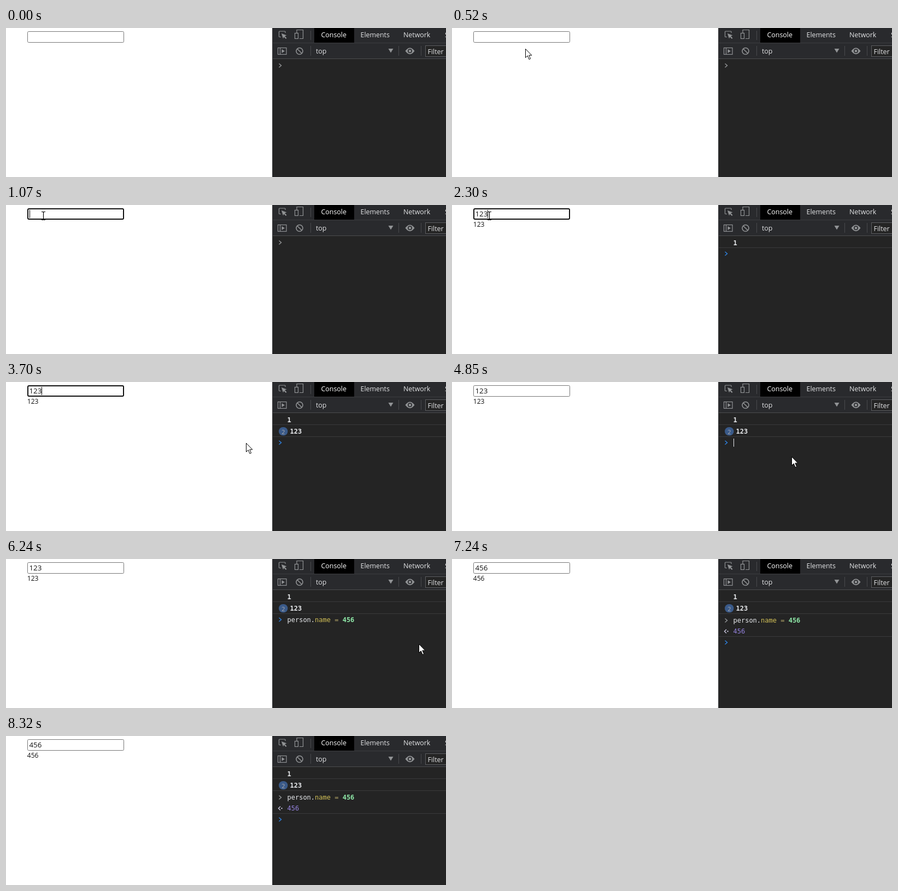
Recreate the animation shown at these times as an HTML page. Size 805 by 274 pixels, loop 8620 ms.

```html
<!DOCTYPE html>
<html lang="en">
<head>
<meta charset="utf-8">
<title>Input bound to an object</title>
<style>
html, body { margin: 0; width: 100%; height: 100%; overflow: hidden; background: #fff; }
svg { display: block; width: 805px; height: 274px; }
text { white-space: pre; }
.ui { font: 12.4px "Open Sans", "Noto Sans", sans-serif; fill: #e3e4e6; }
.page { font: 12px "Open Sans", "Noto Sans", sans-serif; fill: #111; }
.mono { font: 12px "DejaVu Sans Mono", monospace; fill: #e8eaed; }
.bold { font-weight: bold; }
.icon { fill: none; stroke: #919395; stroke-width: 1.2; }
.solid { fill: #919395; }
.chev { fill: none; stroke-width: 1.5; }
</style>
</head>
<body>
<svg viewBox="0 0 805 274">
  <rect width="805" height="274" fill="#fff"/>

  <rect id="field" fill="#fff"/>
  <text id="value" class="page" x="42.5" y="21" style="font-size:13.333px"></text>
  <text id="label" class="page" x="38.8" y="40"></text>

  <g id="panel">
    <rect x="487" width="318" height="274" fill="#242424"/>
    <rect x="487" width="318" height="56" fill="#292a2d"/>
    <rect x="564" width="73" height="27" fill="#000"/>
    <path d="M487 27.5H805" stroke="#3c3d40"/>
    <path d="M487 56.5H805" stroke="#4b4c4f"/>
    <path d="M487.5 0V274" stroke="#3f4042"/>
    <path d="M557.5 5V22M557.5 33V51M718.5 33V51M759.5 33V51" stroke="#48494c"/>
    <rect x="767.5" y="32.5" width="60" height="20" fill="#242424" stroke="#5c5d60"/>

    <text class="ui" x="576.5" y="17" style="fill:#fff">Console</text>
    <text class="ui" x="648.5" y="17">Elements</text>
    <text class="ui" x="727" y="17">Network</text>
    <text class="ui" x="803" y="17">Sources</text>
    <text class="ui" x="567" y="47">top</text>
    <text class="ui" x="771.5" y="48">Filter</text>

    <g class="icon">
      <path d="M503 16.5H500.5Q499.500 16.500 499.500 15.500V7Q499.500 6 500.500 6H510Q511 6 511 7V9"/>
      <path d="M532 9V3.500H543.500V19.500H537"/>
      <rect x="528.500" y="9.500" width="6" height="10"/>
      <rect x="497.500" y="36.500" width="15.500" height="12"/>
      <path d="M501.500 36.500V48.500"/>
      <circle cx="537" cy="42.500" r="6" stroke-width="1.600"/>
      <path d="M533 38.500L541 46.500" stroke-width="1.600"/>
    </g>
    <g class="solid">
      <path d="M504 10L513.500 13.500L510 15L513.500 18.500L512 20L508.500 16.500L507 19.500Z"/>
      <path d="M504.500 39V46L510 42.500Z"/>
      <path d="M699.500 38H708.500L704 45.500Z"/>
      <path d="M730.500 42.300Q739 30.500 747.500 42.300Q739 54 730.500 42.300Z"/>
    </g>
    <circle cx="739" cy="42.300" r="3.200" fill="#919395" stroke="#292a2d" stroke-width="1.600"/>
  </g>

  <g id="logOne">
    <text class="mono bold" x="514.500" y="74">1</text>
    <path d="M488 78.500H805" stroke="#3a3a3b"/>
  </g>
  <g id="logTwo">
    <text id="logText" class="mono bold" y="95">123</text>
    <path d="M488 100.500H805" stroke="#3a3a3b"/>
  </g>
  <g id="badge">
    <rect x="499" y="83" width="16.500" height="15.500" rx="7.700" fill="#3a5a89"/>
    <text class="mono" x="507.200" y="95.500" text-anchor="middle" style="font-size:11px;fill:#a0a3a8">2</text>
  </g>
  <text id="command" class="mono" x="514.500"><tspan>person.</tspan><tspan fill="#d2c057">name</tspan><tspan fill="#a89c62"> = </tspan><tspan class="bold" fill="#8fe9a8">456</tspan></text>
  <path id="sent" class="chev" d="M499.500 109.500L503.500 113L499.500 116.500" stroke="#919395"/>
  <g id="result">
    <path class="chev" d="M502 129.500L498.500 133L502 136.500" stroke="#c3c0d8"/>
    <circle cx="504.500" cy="133" r="1.200" fill="#c3c0d8"/>
    <text class="mono" x="514.500" y="137" style="fill:#9482dc">456</text>
    <path d="M488 142.500H805" stroke="#3a3a3b"/>
  </g>
  <path id="prompt" class="chev" d="M499.500 -3.500L503.500 0L499.500 3.500"/>

  <rect id="caret" width="1" height="15"/>
  <path id="beam" d="M-3.500 -7.500H-1L0 -6.500L1 -7.500H3.500M0 -6.500V6.500M-3.500 7.500H-1L0 6.500L1 7.500H3.500" fill="none" stroke-width="1.200"/>
  <path id="arrow" d="M.5 .5V16.500L4.200 13L7 19.700L9.600 18.600L6.800 12.200H11.800Z" fill="#fff" stroke="#000"/>
</svg>
<script>
const LOOP = 8620;
const $ = id => document.getElementById(id);
const show = (id, on) => $(id).setAttribute('display', on ? 'inline' : 'none');
const set = (id, attrs) => {
  for (const key in attrs) $(id).setAttribute(key, attrs[key]);
};
const put = (id, x, y) => set(id, { transform: `translate(${x} ${y})` });
const within = (t, spans) => spans.some(([a, b]) => t >= a && t < b);
// Last entry whose start time has passed.
const latest = (t, list) => list.filter(e => t >= e[0]).pop();

// Pointer moves: start, last step, steps, from, to, vertical bow, ease-out power
const moves = [
  [70, 670, 9, [760, 310], [72, 11], 0, 1.6],
  [820, 1070, 4, [72, 11], [68, 20], 15, 1],
  [3390, 3930, 8, [68, 20], [541, 127], 24, 1.563],
  [4080, 4160, 2, [541, 127], [536, 120], 0, 1],
  [4390, 4391, 1, [536, 120], [540, 120], 0, 1],
  [4770, 5160, 6, [540, 120], [754.5, 156], 7, 1.167],
  [7780, 8240, 7, [754.5, 156], [773, 266], 0, 0.8]
];
const pointerSpans = [[70, 6700], [7780, 8320]];

const values = [[0, ''], [1910, '1'], [2230, '12'], [2300, '123'], [6700, '456']];
const labels = [[0, ''], [1990, '1'], [2230, '12'], [2300, '123'], [6700, '456']];
const prompts = [[0, 69], [2060, 89.5], [2380, 111.5], [6700, 133], [6780, 153.5]];
const fieldCaret = [[980, 1530], [1910, 2840], [3390, 3930], [4470, 4540]];
const consoleCaret = [[4620, 5160], [5540, 6240], [6780, 7240], [7700, 8240]];

function pointerAt(t) {
  const [start, end, n, from, to, bow, power] = latest(t, moves);
  const k = Math.min(n, Math.floor((t - start) / (end - start) * (n - 1) + 0.05) + 1);
  const s = 1 - (1 - k / n) ** power;
  return [
    from[0] + (to[0] - from[0]) * s,
    from[1] + (to[1] - from[1]) * s + 2 * s * (1 - s) * bow
  ];
}

function drawPointer(t) {
  const visible = within(t, pointerSpans);
  const [x, y] = visible ? pointerAt(t) : [-50, -50];
  const inField = x > 39 && x < 216 && y > 6 && y < 27;
  const inPrompt = x > 510 && y > 104 && y < 126;
  const text = inField || inPrompt;
  show('beam', visible && text);
  show('arrow', visible && !text);
  put('beam', Math.round(x) + 0.5, Math.round(y));
  put('arrow', Math.round(x), Math.round(y));
  set('beam', { stroke: inPrompt ? '#fff' : '#000' });
  return inField;
}

function drawField(t, hover) {
  const focused = t >= 980 && t < 4540;
  const inset = focused ? 1 : 0.5;
  set('field', {
    x: 39 + inset, y: 6 + inset, width: 177 - 2 * inset, height: 21 - 2 * inset, rx: 2,
    stroke: focused ? '#101010' : hover ? '#4f4f4f' : '#767676',
    'stroke-width': 2 * inset
  });
  $('value').textContent = latest(t, values)[1];
  $('label').textContent = latest(t, labels)[1];
}

function drawConsole(t) {
  show('logOne', t >= 2060);
  show('logTwo', t >= 2380);
  show('badge', t >= 2460);
  set('logText', { x: t >= 2460 ? 519.5 : 514.5 });
  show('command', t >= 5690);
  set('command', { y: t >= 6700 ? 117 : 116 });
  show('sent', t >= 6700);
  show('result', t >= 6780);
  put('prompt', 0, latest(t, prompts)[1]);
  set('prompt', { stroke: t >= 2060 ? '#2f80dc' : '#919395' });
}

function drawCaret(t) {
  const inField = within(t, fieldCaret);
  const inConsole = within(t, consoleCaret);
  show('caret', inField || inConsole);
  if (inField) {
    const count = latest(t, values)[1].length;
    set('caret', { x: Math.round(42.6 + 7.5 * count), y: 9, fill: '#000' });
  } else if (inConsole) {
    const typed = t >= 5690 && t < 6700;
    set('caret', { x: typed ? 638 : 515, y: t >= 6700 ? 146 : 104, fill: '#e8eaed' });
  }
}

function draw(t) {
  const hover = drawPointer(t);
  drawField(t, hover);
  drawConsole(t);
  drawCaret(t);
}

const begin = performance.now();
function tick() {
  draw((performance.now() - begin) % LOOP);
  requestAnimationFrame(tick);
}
draw(0);
requestAnimationFrame(tick);
</script>
</body>
</html>
```
